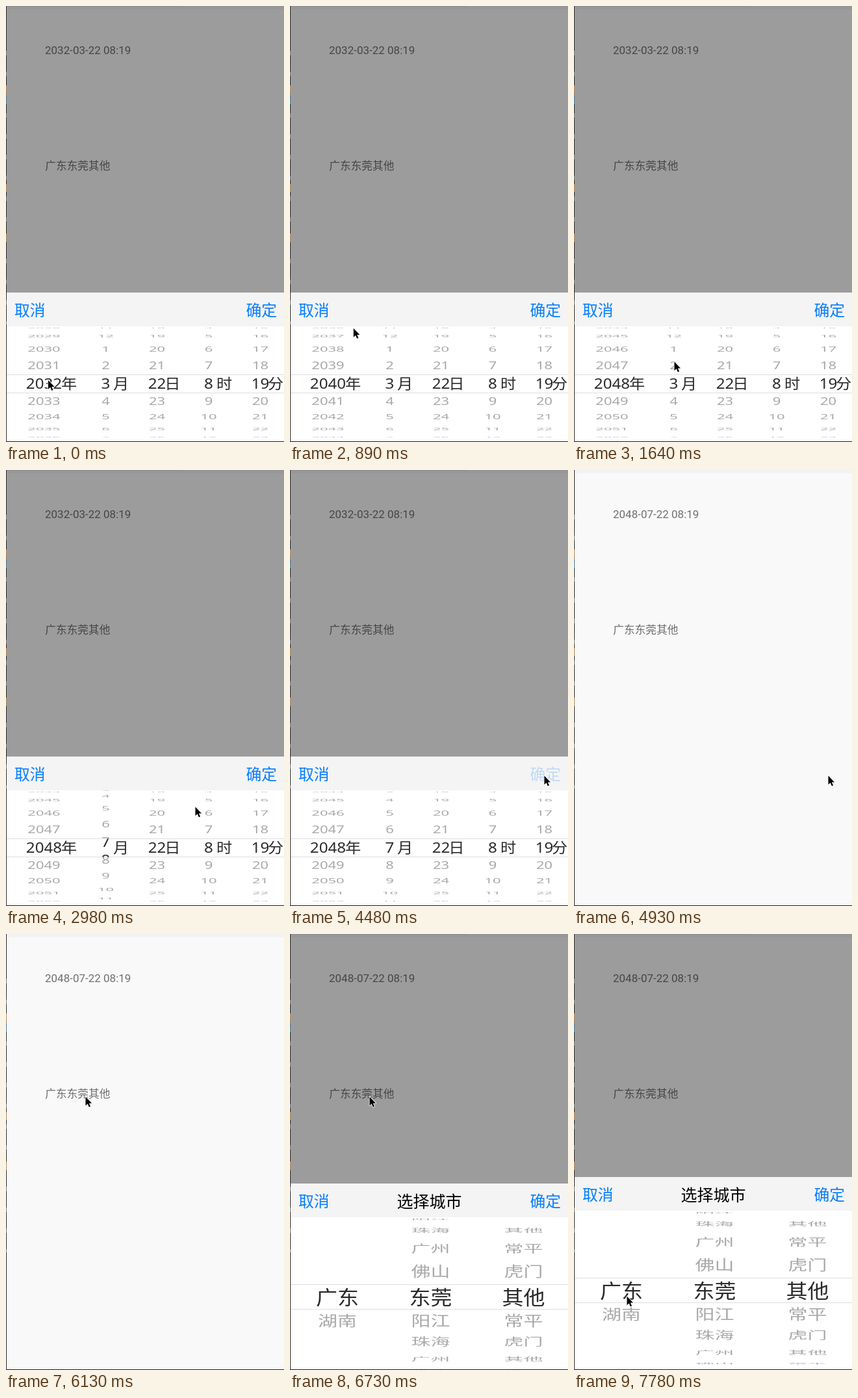
These frames come from a looping animation (428x671 px, 8 s). An HTML page:

```html
<!DOCTYPE html>
<html lang="zh-CN">
<head>
<meta charset="utf-8">
<title>Wheel pickers</title>
<style>
  html, body { margin: 0; width: 100%; height: 100%; overflow: hidden; background: #f9f9f9; }
  svg { display: block; width: 428px; height: 671px; }
  text { font-family: "Noto Sans", "Noto Sans CJK SC", "Noto Sans CJK", sans-serif; white-space: pre; }
  .label { fill: #6f6f6f; font-size: 16.7px; }
  .date { font-family: Roboto, sans-serif; font-size: 17px; }
  .button { fill: #057dff; font-size: 23.8px; }
  .title { fill: #000; font-size: 25px; text-anchor: middle; }
  .outer { fill: #a8a8a8; text-anchor: middle; }
  .inner { fill: #2a2a2a; text-anchor: middle; }
  .unit { text-anchor: start; }
  .rule { stroke: #dedede; }
</style>
</head>
<body>
<svg viewBox="0 0 428 671" xmlns="http://www.w3.org/2000/svg">
  <rect width="428" height="671" fill="#f9f9f9"/>
  <rect width="428" height="5" fill="#f2f2f2"/>
  <text id="date" class="label date" x="60" y="74"></text>
  <text class="label" x="60.3" y="252.3">广东东莞其他</text>
  <g id="shade">
    <rect width="428" height="671" fill="#000" fill-opacity=".376"/>
    <rect width="272" height="1" fill="#8c8c8c"/>
  </g>
  <g id="time"></g>
  <g id="city"></g>
  <g id="edge">
    <rect y="670" width="428" height="1" fill="#1c1c1c"/>
    <rect width="1" height="671" fill="#2b2b2d"/>
    <path d="M.5 69V490" stroke="#77787a" stroke-dasharray="7 25"/>
    <path d="M.5 122v12M.5 274v12M.5 350v12" stroke="#b98350"/>
    <path d="M.5 141v10" stroke="#3f7fae"/>
  </g>
  <path id="cursor" d="M0 0V13.7L3.2 10.7 5.3 15.8 7.6 14.9 5.4 9.9H9.6Z"
        fill="#000" stroke="#fff" stroke-width="1.6" paint-order="stroke" stroke-linejoin="round"/>
</svg>
<script>
const $ = id => document.getElementById(id);
const range = (from, to) => Array.from({ length: to - from + 1 }, (_, i) => from + i);
const HEAD = 52, STRETCH = 1.1, DROP = 2, STEP_ANGLE = Math.PI / 10;

const timePicker = {
  id: 'time', y: 441, radius: 88.5, size: 22, title: '',
  wheels: [
    { x: 58.5, items: range(1990, 2100), unit: '年', unitX: 85 },
    { x: 153.5, items: range(1, 12), unit: '月', unitX: 165 },
    { x: 232.5, items: range(1, 31), unit: '日', unitX: 244.3 },
    { x: 312, items: range(0, 23), unit: '时', unitX: 324 },
    { x: 391.5, items: range(0, 59), unit: '分', unitX: 403 }
  ]
};
const cityPicker = {
  id: 'city', y: 374, radius: 122.2, size: 30, title: '选择城市',
  wheels: [
    { x: 73, items: ['广东', '湖南'], once: true },
    { x: 216.5, items: ['东莞', '阳江', '珠海', '广州', '佛山'] },
    { x: 359.5, items: ['其他', '常平', '虎门'] }
  ]
};

function build(p) {
  const mid = HEAD + p.radius, row = p.radius * STEP_ANGLE;
  p.mid = mid;
  p.textHeight = row / 1.4;
  const top = mid - row / 2, bottom = mid + row / 2, end = mid + p.radius;
  const baseline = mid + p.textHeight / 2 - DROP;
  const units = p.wheels.filter(w => w.unit).map(w =>
    `<text class="inner unit" font-size="${p.size}" transform="translate(${w.unitX} ${baseline}) scale(${STRETCH} 1)">${w.unit}</text>`);
  const ruleAt = y => `<path class="rule" d="M0 ${Math.floor(y) + .5}H428"/>`;
  p.root = $(p.id);
  p.root.innerHTML = `
    <clipPath id="${p.id}Out"><path d="M0 ${HEAD}H428V${top}H0ZM0 ${bottom}H428V${end}H0Z"/></clipPath>
    <clipPath id="${p.id}In"><path d="M0 ${top}H428V${bottom}H0Z"/></clipPath>
    <rect width="428" height="320" fill="#fff"/>
    <rect width="428" height="${HEAD}" fill="#f4f4f4"/>
    <text class="button" x="13" y="36">取消</text>
    <text class="title" x="214.5" y="36.5">${p.title}</text>
    <text class="button ok" x="369.5" y="36">确定</text>
    ${ruleAt(top)}${ruleAt(bottom)}
    <g class="outer" font-size="${p.size}" clip-path="url(#${p.id}Out)"></g>
    <g class="inner" font-size="${p.size}" clip-path="url(#${p.id}In)"></g>
    ${units.join('')}`;
}

// Items sit on a drum, 18 degrees apart; their height shrinks with the squared cosine.
function rows(p, wheel, value, inner) {
  const reach = inner ? 1.5 : 5, n = wheel.items.length;
  const base = p.textHeight - (inner ? DROP : 0);
  let out = '';
  for (let i = Math.ceil(value - reach); i <= value + reach; i++) {
    const wrapped = i < 0 ? i + n : i >= n ? i - n : i;
    const text = wheel.items[wheel.once ? i : wrapped];
    if (text === undefined) continue;
    const a = (i - value) * STEP_ANGLE, squash = Math.cos(a);
    const y = p.mid + p.radius * Math.sin(a) - squash * p.textHeight / 2;
    const sx = inner ? STRETCH : 1, sy = squash ** 2 * (inner ? 1 : .8);
    out += `<text y="${base}" transform="translate(${wheel.x} ${y}) scale(${sx} ${sy})">${text}</text>`;
  }
  return out;
}

function turn(p, values) {
  for (const name of ['outer', 'inner'])
    p.root.querySelector('g.' + name).innerHTML =
      p.wheels.map((w, i) => rows(p, w, values[i], name === 'inner')).join('');
}

const smooth = f => f * f * (3 - 2 * f);
const easeIn = f => f * f;
const easeOut = f => 1 - (1 - f) ** 2;

// Eased progress from 0 to 1 between two steps.
const ramp = (k, from, to, ease = smooth) =>
  ease(Math.min(1, Math.max(0, (k - from) / (to - from))));

// Each move of the pointer: first step, last step, where it ends.
const home = { x: 65, y: 576 };
const moves = [
  { from: 0, to: 3, x: 67, y: 468 },
  { from: 3, to: 8, x: 154.5, y: 547.5 },
  { from: 11, to: 14, x: 158, y: 456 },
  { from: 14, to: 20, x: 291.5, y: 518.5 },
  { from: 20, to: 24, x: 391.5, y: 470.5 },
  { from: 36, to: 41, x: 122.5, y: 250.5 },
  { from: 48, to: 52, x: 81.5, y: 557.5 }
];

function pointerAt(k) {
  let { x, y } = home;
  for (const m of moves) {
    const f = ramp(k, m.from, m.to);
    x += (m.x - x) * f;
    y += (m.y - y) * f;
  }
  return `translate(${x} ${y})`;
}

function place(p, shown, dy) {
  p.root.style.display = shown ? '' : 'none';
  p.root.setAttribute('transform', `translate(0 ${p.y + dy})`);
}

function draw(k) {
  const timeOpen = k < 33, cityOpen = k >= 45;
  const year = 2032 + 16 * ramp(k, 0, 10);
  // The month rolls a little too far, then settles back.
  const month = 3 + 4.32 * ramp(k, 11, 18) - .32 * ramp(k, 20, 22);
  turn(timePicker, [year - 1990, month - 1, 21, 8, 19]);
  place(timePicker, timeOpen, 240 * ramp(k, 30, 33, easeIn));
  place(cityPicker, cityOpen, 10 - 10 * ramp(k, 45, 47, easeOut));
  timePicker.root.querySelector('.ok').style.opacity = k === 30 ? .22 : 1;
  $('shade').style.display = timeOpen || cityOpen ? '' : 'none';
  $('date').textContent = k < 31 ? '2032-03-22 08:19' : '2048-07-22 08:19';
  $('cursor').setAttribute('transform', pointerAt(k));
}

build(timePicker);
build(cityPicker);
turn(cityPicker, [0, 0, 0]);

// The picture advances in 150 ms steps, with a slight drift.
const start = performance.now();
let last = -1;
function tick() {
  const t = (performance.now() - start) % 8000;
  const drift = t < 1190 ? 0 : t < 2980 ? 10 : 20;
  const k = Math.floor((t + drift) / 150);
  if (k !== last) draw(last = k);
  requestAnimationFrame(tick);
}
tick();
</script>
</body>
</html>
```
